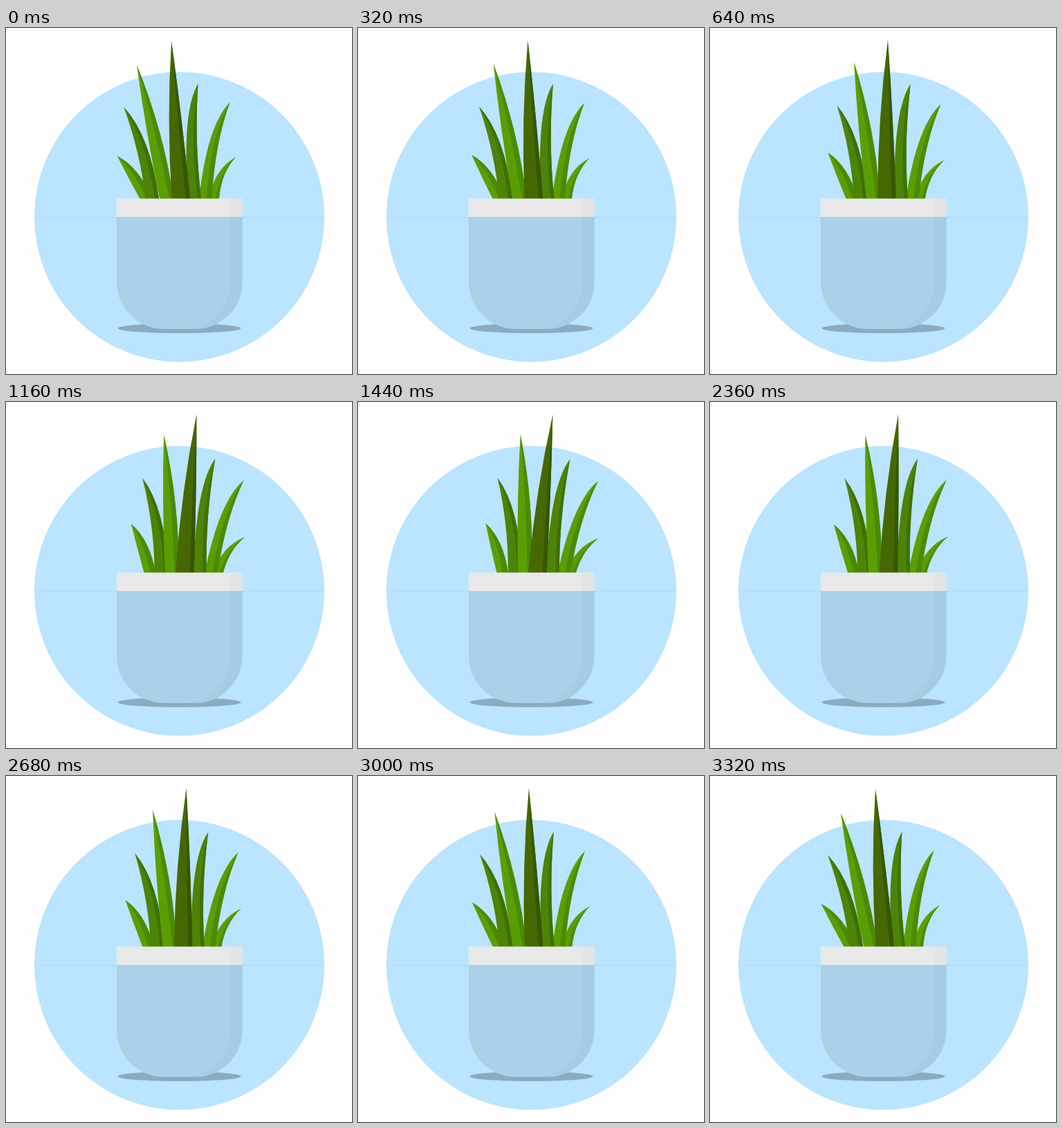
Animation of 500x500 px, one loop 3360 ms. Source, as an HTML page with a canvas:

```html
<!DOCTYPE html>
<html lang="en">
<head>
<meta charset="utf-8">
<title>Swaying plant</title>
<style>
  html, body { margin: 0; height: 100%; overflow: hidden; background: #fefefe; }
  canvas { display: block; }
</style>
</head>
<body>
<canvas id="stage" width="500" height="500"></canvas>
<script>
const ctx = document.getElementById('stage').getContext('2d');
const LOOP = 3360, STEP = 40, SOIL = 246;

// Sway progress: [time, value, speed per ms]
const sway = [
  [0, 0, 0], [640, .4, .00072], [1160, .81, .0006], [1740, 1, 0],
  [2360, .735, -.00068], [2680, .48, -.0008], [3320, 0, 0], [3360, 0, 0]
];

const bright = ['#5a9e03', '#4b8a03'];
const medium = ['#4d8306', '#407002'];
const deep = ['#456802', '#365600'];

// Each edge is [control x, control y, x at the soil]
const blades = [
  { tip: [332, 186.5], left: [302, 203, 293], rib: [309, 206, 303], right: [311, 209, 308],
    pivot: [278, 281], turn: .18, tone: bright },
  { tip: [323.5, 107.5], left: [291, 140, 279], rib: [296, 155, 290], right: [302, 165, 297.5],
    pivot: [271, 338], turn: .109, tone: bright },
  { tip: [277.5, 80.5], left: [254, 120, 263], rib: [265, 150, 277], right: [272, 163, 282],
    pivot: [276, 320], turn: .128, tone: medium },
  { tip: [160.7, 185], left: [177, 217, 193], rib: [185, 206, 202], right: [192, 201, 211],
    pivot: [208.7, 269], turn: .28, tone: bright },
  { tip: [170.3, 114.5], left: [194, 180, 201.5], rib: [203, 165, 215], right: [208, 155, 221],
    pivot: [226, 371], turn: .128, tone: medium },
  { tip: [189, 53.5], left: [202, 150, 222], rib: [217, 150, 236], right: [228, 150, 242],
    pivot: [246, 291], turn: .2, tone: bright },
  { tip: [239, 18.5], left: [232, 132, 239.5], rib: [248, 132, 260], right: [254.5, 132, 266],
    pivot: [261.3, 288], turn: .166, tone: deep }
];

function progress(t) {
  const i = sway.findIndex(key => key[0] > t);
  const [t0, v0, m0] = sway[i - 1], [t1, v1, m1] = sway[i];
  const d = t1 - t0, s = (t - t0) / d, r = 1 - s;
  return v0 * r * r * (1 + 2 * s) + v1 * s * s * (3 - 2 * s)
    + d * s * r * (m0 * r - m1 * s);
}

function fill(color, path) {
  ctx.fillStyle = color;
  ctx.beginPath();
  path();
  ctx.fill();
}

// Fills the area between two edges, extended a little below the soil line
function leaf([tx, ty], [ax, ay, a], [bx, by, b], color) {
  const foot = (cx, cy, x) => [x + (x - cx) * 14 / (SOIL - cy), SOIL + 14];
  fill(color, () => {
    ctx.moveTo(tx, ty);
    ctx.quadraticCurveTo(ax, ay, a, SOIL);
    ctx.lineTo(...foot(ax, ay, a));
    ctx.lineTo(...foot(bx, by, b));
    ctx.lineTo(b, SOIL);
    ctx.quadraticCurveTo(bx, by, tx, ty);
  });
}

function drawBlade({ tip, left, rib, right, pivot: [x, y], turn, tone }, p) {
  ctx.save();
  ctx.translate(x, y);
  ctx.rotate(turn * p);
  ctx.translate(-x, -y);
  leaf(tip, left, right, tone[0]);
  leaf(tip, rib, right, tone[1]);
  ctx.restore();
}

function drawPot() {
  fill('#8babc0', () => ctx.ellipse(250.5, 434, 89, 7, 0, 0, 7));
  fill('#abd1e9', () => ctx.roundRect(160, 272, 181.4, 163, [0, 0, 68, 68]));
  fill('#a6cce4', () => {
    ctx.moveTo(324.5, 273);
    ctx.lineTo(341.4, 273);
    ctx.lineTo(341.4, 367);
    ctx.arc(273.4, 367, 68, 0, Math.PI / 2);
    ctx.lineTo(262, 435);
    ctx.bezierCurveTo(299, 433, 324.5, 403, 324.5, 364);
  });
  fill('#e9e9e9', () => ctx.rect(160, 246.6, 181.4, 26.4));
  fill('#e4e4e4', () => ctx.rect(324.5, 246.6, 16.9, 26.4));
}

function draw(now) {
  const p = progress(Math.floor(now % LOOP / STEP) * STEP);
  fill('#fefefe', () => ctx.rect(0, 0, 500, 500));
  fill('#bae4ff', () => ctx.arc(250.5, 273, 209.5, 0, 7));
  fill('#b0d9f2', () => ctx.rect(41, 273, 419, 1));
  blades.forEach(blade => drawBlade(blade, p));
  drawPot();
}

const start = performance.now();
function tick() {
  draw(performance.now() - start);
  requestAnimationFrame(tick);
}
tick();
</script>
</body>
</html>
```
